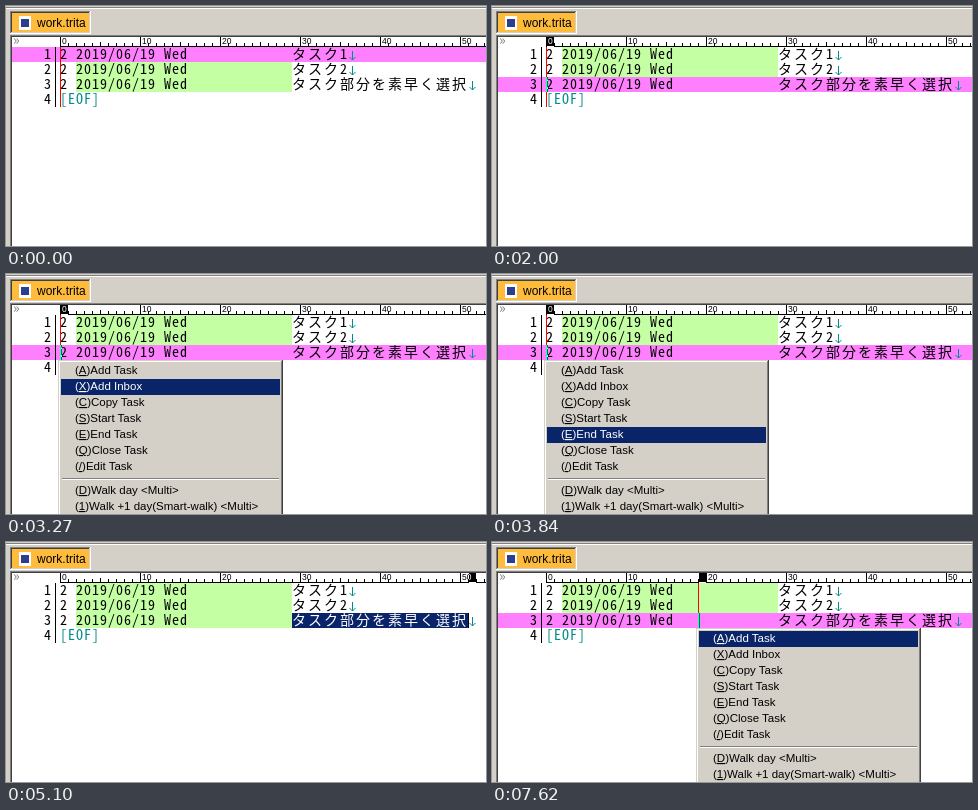
An HTML page for the animation above (8000 ms loop, 480 by 240 pixels).

```html
<!DOCTYPE html>
<html lang="ja">
<head>
<meta charset="utf-8">
<title>Task editor</title>
<style>
  html, body { margin: 0; width: 100%; height: 100%; overflow: hidden; background: #fff; }
  svg { display: block; width: 480px; height: 240px; }
  rect, path { shape-rendering: crispEdges; }
  text { white-space: pre; }
  .code { font: 300 14px "Noto Sans Mono CJK JP", "Noto Sans Mono", monospace; }
  .kana { font: 300 14px "Noto Sans CJK JP", "Noto Sans CJK", sans-serif; letter-spacing: 2px; }
  .ui { font: 11.5px "Liberation Sans", sans-serif; }
  .tab { font: 12px "Liberation Sans", sans-serif; }
  .tick { font: 8.5px "Liberation Sans", sans-serif; }
  .invert { fill: #fff; mix-blend-mode: difference; }
  .key { text-decoration: underline; }
</style>
</head>
<body>
<svg id="stage" viewBox="0 0 480 240"></svg>
<script>
const LOOP = 8000;
const CELL = 8, LINE = 15, LEFT = 54, TOP = 41;
const FACE = '#d4d0c8', SHADE = '#808080', DARK = '#404040';
const NAVY = '#0a246a', TEAL = '#008c8c', GREEN = '#c4ffa4', PINK = '#ff80ff';
const DATE_COL = 2, TASK_COL = 29;

const TASKS = [['タスク', '1'], ['タスク', '2'], ['タスク部分を素早く選択', '']];
const MENU = ['(A)Add Task', '(X)Add Inbox', '(C)Copy Task', '(S)Start Task', '(E)End Task',
  '(Q)Close Task', '(/)Edit Task', '(D)Walk day <Multi>', '(1)Walk +1 day(Smart-walk) <Multi>'];

// Each step overrides part of the state from its time on.
const STEPS = [
  [0, { row: 0, band: 474, col: 0, mark: 0, focus: false, caret: false, select: false, menu: false, item: 0 }],
  [750, { focus: true, caret: true }],
  [1300, { caret: false }],
  [1730, { row: 1, caret: true }],
  [1850, { row: 2, band: 48, caret: false }],
  [2000, { band: 474, caret: true }],
  [2430, { menu: true }],
  [3270, { item: 1 }],
  [3570, { item: 2 }],
  [3690, { item: 3 }],
  [3840, { item: 4 }],
  [4120, { item: 5 }],
  [4270, { item: 6 }],
  [5100, { menu: false, select: true, col: 51, mark: 51 }],
  [5660, { caret: false }],
  [6090, { caret: true }],
  [6370, { select: false, col: 29, mark: 29 }],
  [6650, { col: 27, mark: 27 }],
  [6800, { col: 22, mark: 23 }],
  [6950, { col: 21, mark: 21 }],
  [7070, { col: 20, mark: 20 }],
  [7220, { col: 19, mark: 19 }],
  [7620, { menu: true, item: 0 }]
];

const stage = document.getElementById('stage');
const colX = col => LEFT + col * CELL;
const rowY = row => TOP + row * LINE;

function add(tag, attrs, parent = stage) {
  const node = document.createElementNS('http://www.w3.org/2000/svg', tag);
  set(node, attrs);
  return parent.appendChild(node);
}
function set(node, attrs) {
  for (const name in attrs) node.setAttribute(name, attrs[name]);
}
function box(x, y, width, height, fill, parent) {
  return add('rect', { x, y, width, height, fill }, parent);
}
function label(x, y, content, style, fill = '#000', parent) {
  const node = add('text', { x, y, class: style, fill }, parent);
  node.textContent = content;
  return node;
}
// Half-width text, one character per editor cell.
function code(col, row, content, fill) {
  const cells = [...content].map((_, i) => colX(col + i)).join(' ');
  return label(cells, rowY(row) + 12, content, 'code', fill);
}
function show(node, visible) {
  node.style.display = visible ? '' : 'none';
}

function drawWindow() {
  box(0, 0, 480, 240, '#fff');
  box(0, 0, 480, 31, FACE);
  box(0, 1, 480, 1, SHADE);
  box(0, 2, 480, 1, '#fff');
  box(0, 31, 6, 209, FACE);
  box(4, 29, 476, 1, SHADE);
  box(5, 30, 475, 1, DARK);
  box(4, 29, 1, 211, SHADE);
  box(5, 30, 1, 210, DARK);

  box(4, 5, 81, 23, '#fff');
  box(4, 5, 80, 22, SHADE);
  box(5, 6, 79, 21, FACE);
  box(5, 6, 78, 20, DARK);
  box(6, 7, 77, 19, '#ffbc3c');
  box(13, 10, 12, 14, '#fff');
  box(15, 13, 8, 8, '#2c3f8f');
  label(31, 21, 'work.trita', 'tab');
}

function drawRuler() {
  label(7, 39, '»', 'code', SHADE);
  box(LEFT, 40, 480 - LEFT, 1, '#000');
  for (let col = 0; colX(col) < 480; col++) {
    const height = col % 10 === 0 ? 9 : col % 5 === 0 ? 4 : 3;
    box(colX(col), 40 - height, 1, height, '#000');
    if (col % 10 === 0) label(colX(col) + 2, 38, col, 'tick');
  }
}

function drawArrow(col, row) {
  const x = colX(col) + 4, y = rowY(row) + 4;
  add('path', { d: `M${x + .5} ${y}v9m-3 -3l3 3l3 -3`, fill: 'none', stroke: TEAL,
    style: 'shape-rendering:auto' });
}

function drawLines() {
  for (let row = 0; row < 4; row++) code(-2, row, String(row + 1));
  box(49, TOP, 1, 4 * LINE, '#000');
  const tasks = TASKS.map(([name, digit], row) => {
    const end = TASK_COL + name.length * 2;
    code(0, row, '2 2019/06/19 Wed');
    if (digit) code(end, row, digit);
    drawArrow(end + digit.length, row);
    return label(colX(TASK_COL), rowY(row) + 12, name, 'kana');
  });
  code(0, 3, '[EOF]', TEAL);
  return tasks;
}

function drawMenu() {
  const group = add('g', {});
  box(0, 0, 225, 160, DARK, group);
  box(0, 0, 224, 160, FACE, group);
  box(1, 1, 223, 160, SHADE, group);
  box(1, 1, 222, 160, '#fff', group);
  box(2, 2, 221, 160, FACE, group);
  box(4, 118, 217, 1, SHADE, group);
  box(4, 119, 217, 1, '#fff', group);
  const bar = box(3, 3, 219, 16, NAVY, group);
  const items = MENU.map((caption, i) => {
    const node = label(17, 14 + i * 16 + (i > 6 ? 8 : 0), '(', 'ui', '#000', group);
    const key = add('tspan', { class: 'key' }, node);
    key.textContent = caption[1];
    node.append(caption.slice(2));
    return node;
  });
  return { group, bar, items };
}

drawWindow();
drawRuler();
for (let row = 0; row < 3; row++) {
  box(colX(DATE_COL), rowY(row), (TASK_COL - DATE_COL) * CELL, LINE, GREEN);
}
const band = box(6, TOP, 474, LINE, PINK);
const selection = box(colX(TASK_COL), rowY(2), 22 * CELL, LINE, NAVY);
const tasks = drawLines();
const guide = box(LEFT, TOP, 1, 4 * LINE, '#f00');
const mark = add('rect', { y: 31, width: CELL - 1, height: 10, class: 'invert' });
const caret = add('rect', { height: LINE, class: 'invert' });
const menu = drawMenu();

function render(time) {
  const state = Object.assign({}, ...STEPS.filter(([at]) => at <= time).map(([, change]) => change));
  const x = colX(state.col);

  show(band, !state.select);
  set(band, { y: rowY(state.row), width: state.band });
  show(selection, state.select);
  set(tasks[2], { fill: state.select ? '#fff' : '#000' });

  show(guide, !state.select);
  set(guide, { x });
  show(mark, state.focus);
  set(mark, { x: colX(state.mark) + 1 });
  show(caret, state.caret);
  set(caret, { x, y: rowY(state.row), width: state.select ? 1 : 2 });

  show(menu.group, state.menu);
  set(menu.group, { transform: `translate(${x - 2} 86)` });
  set(menu.bar, { y: 3 + state.item * 16 });
  menu.items.forEach((node, i) => set(node, { fill: i === state.item ? '#fff' : '#000' }));
}

const start = performance.now();
function tick() {
  render((performance.now() - start) % LOOP);
  requestAnimationFrame(tick);
}
tick();
</script>
</body>
</html>
```
